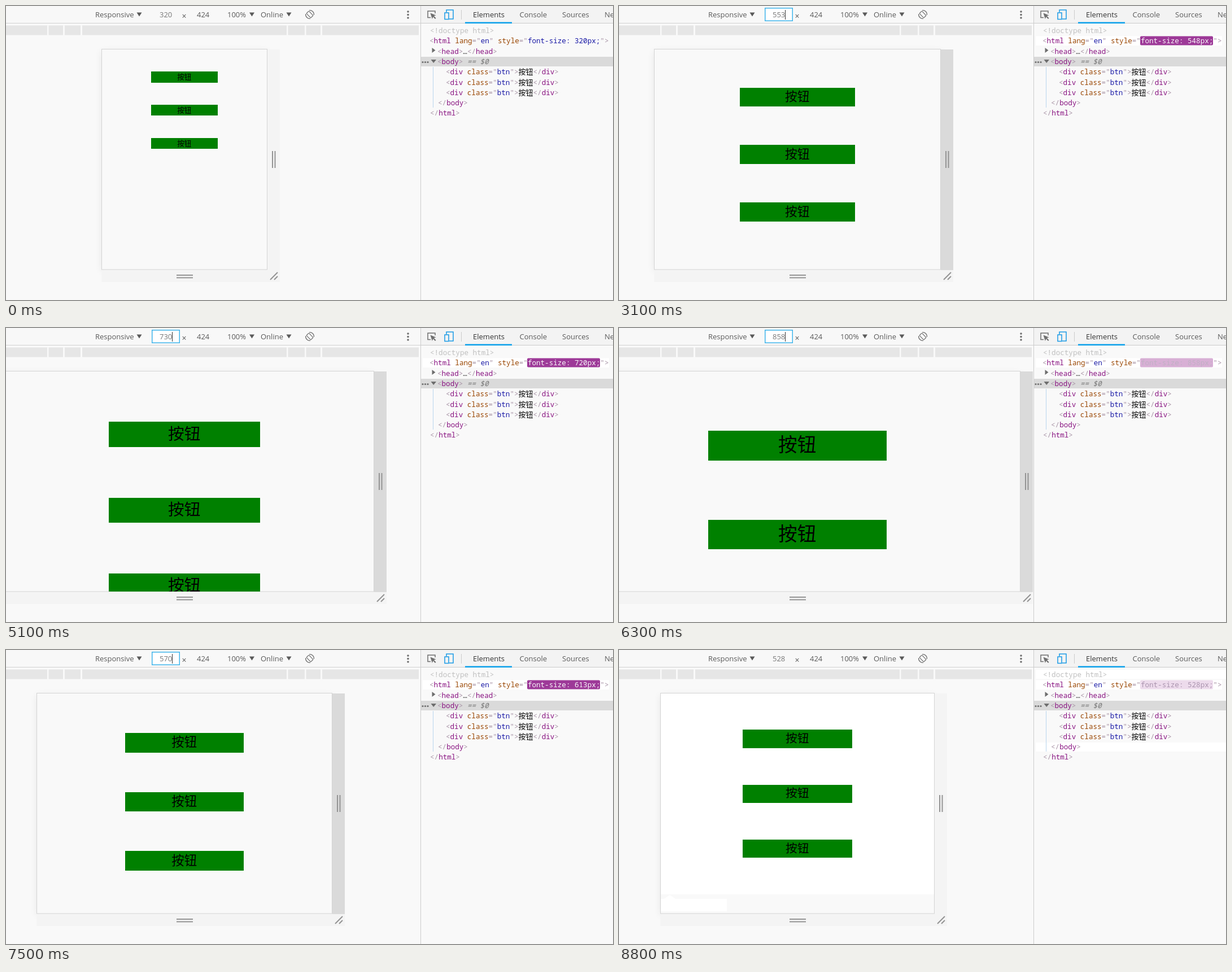
Write an HTML page that moves like this. It is 1075 by 521 pixels and loops after 8900 ms.

```html
<!DOCTYPE html>
<html lang="en">
<head>
<meta charset="utf-8">
<style>
html, body { margin: 0; width: 100%; height: 100%; overflow: hidden; background: #f9f9f9; }
svg { display: block; }
text { white-space: pre; }
.ui { font: 13px "Open Sans", "Noto Sans", sans-serif; fill: #5a5a5a; }
.code { font: 12.6px "Noto Sans Mono", monospace; fill: #a894a6; }
.cjk { font-family: "Noto Sans CJK SC", "Noto Sans CJK", sans-serif; fill: #000; }
.tag { fill: #881280; }
.attr { fill: #994500; }
.val { fill: #1a1aa6; }
.line { fill: none; stroke: #6e6e6e; stroke-width: 1.5; }
.grip { fill: none; stroke: #949494; stroke-width: 2; }
</style>
</head>
<body>
<svg width="1075" height="521" viewBox="0 0 1075 521">
  <defs>
    <clipPath id="view"><rect y="52" width="734" height="469"/></clipPath>
    <clipPath id="page"><rect y="77" width="734" height="390"/></clipPath>
    <filter id="soft" x="-10%" y="-10%" width="120%" height="120%"><feGaussianBlur stdDeviation="7"/></filter>
  </defs>

  <g clip-path="url(#view)">
    <rect id="shadow" y="80" height="390" opacity=".07" filter="url(#soft)"/>
    <rect id="bottomBar" y="467" height="22" fill="#f4f4f4"/>
    <rect id="sideBar" y="77" width="22" height="391"/>
    <rect id="device" y="76.5" height="390.5" fill="#f9f9f9" stroke="#d4d4d4"/>
    <g id="late">
      <path fill="#fff" d="M74 77H558V433H74zM74 441H80L90 434 100 441H191V463H74z"/>
    </g>
    <g id="buttons" clip-path="url(#page)" text-anchor="middle"></g>
    <path class="grip" d="M302 477H331M302 481.5H331"/>
    <g id="grips" class="grip">
      <path d="M9 257V287M13.5 257V287M5 485L18 472M12 485L18 479"/>
    </g>
  </g>

  <rect width="734" height="30" fill="#f8f8f8"/>
  <path stroke="#d0d0d0" d="M0 30.5H734"/>
  <path stroke="#e6e6e6" stroke-width="17" d="M0 43H73M75.5 43H101M104 43H132M135 43H497M499.5 43H529M531.5 43H557M560 43H731"/>
  <g class="ui">
    <text x="158" y="20">Responsive</text>
    <text x="311.500" y="22.500" font-size="14">×</text>
    <text x="338" y="20">424</text>
    <text x="392" y="20">100%</text>
    <text x="451" y="20">Online</text>
  </g>
  <path fill="#5a5a5a" d="M231.500 11.500h9l-4.500 7zM431 11.500h9l-4.500 7zM496.500 11.500h9l-4.500 7z"/>
  <g transform="translate(538 15)" class="line" style="stroke-width:1.2">
    <rect x="-3" y="-5.500" width="6" height="11" rx="1" transform="rotate(-45)"/>
    <path d="M-1 -7.300A7.300 7.300 0 0 1 7.300 1M1 7.300A7.300 7.300 0 0 1 -7.300 -1"/>
  </g>
  <g fill="#6e6e6e"><circle cx="712" cy="10" r="1.800"/><circle cx="712" cy="15.500" r="1.800"/><circle cx="712" cy="21" r="1.800"/></g>
  <rect id="focus" x="258.750" y="3.750" width="48.500" height="22.500" fill="#fff" stroke="#3fb4ea" stroke-width="1.500"/>
  <path id="caret" stroke="#333" d="M294.500 7V24"/>
  <text id="width" class="ui" x="272" y="20" style="fill:#777"></text>

  <rect x="734" width="341" height="521" fill="#f9f9f9"/>
  <rect x="734" width="341" height="30" fill="#f3f3f3"/>
  <path stroke="#ccc" d="M734.500 0V521M734 30.500H1075M806.500 7V24"/>
  <path fill="#0a9fea" d="M813 28.500H896V31H813z"/>
  <path class="line" d="M752 20.500H747V9H760V13"/>
  <path fill="#6e6e6e" d="M751.500 12.500L761.500 16.500 757.800 17.800 761.500 21.500 760 23 756.300 19.300 754.800 23z"/>
  <path class="line" style="stroke:#1a9be6" d="M780 11V7H792V23H785M777 12H784V23.500H777z"/>
  <g class="ui">
    <text x="827" y="20" style="fill:#333">Elements</text>
    <text x="909.500" y="20">Console</text>
    <text x="985" y="20">Sources</text>
    <text x="1060" y="20">Network</text>
  </g>

  <rect id="rowDoctype" x="738" y="35" width="337" height="16" fill="#fff"/>
  <rect id="rowHtml" x="738" y="53.500" width="330" height="16.500" fill="#fff"/>
  <rect id="rowEnd" x="738" y="164" width="337" height="16" fill="#fff"/>
  <rect x="735" y="90" width="340" height="17" fill="#dadada"/>
  <path stroke="#b8d6ee" d="M756.500 108V180"/>
  <path fill="#6e6e6e" d="M754.500 74L760.500 78.500 754.500 83zM752.500 95H762L757.200 101z"/>
  <g fill="#6e6e6e"><circle cx="738" cy="99.500" r="1.600"/><circle cx="742.500" cy="99.500" r="1.600"/><circle cx="747" cy="99.500" r="1.600"/></g>
  <rect id="flash" x="923" y="53.500" width="129" height="16" rx="2" fill="rgb(152,46,146)"/>
  <g id="tree" class="code"></g>
</svg>
<script>
const LOOP = 8900, STEP = 100, CENTER = 315.9, TOP = 76.7, ZOOM = 0.92;
// Viewport width over time: [ms, px]
const KEYS = [[1300, 320], [1700, 403], [1800, 410], [2200, 461], [3000, 548], [3100, 553],
  [4000, 628], [5000, 720], [5100, 730], [5800, 848], [5900, 858], [6600, 858],
  [7400, 613], [7500, 570], [7600, 548], [7700, 535], [7800, 528]];

const $ = id => document.getElementById(id);
const set = (el, attrs) => { for (const k in attrs) el.setAttribute(k, attrs[k]); };
const show = (id, on) => { $(id).style.display = on ? '' : 'none'; };

const span = (cls, s) => `<tspan class="${cls}">${s}</tspan>`;
const open = (name, attrs = '') => '&lt;' + span('tag', name) + attrs + '&gt;';
const close = name => '&lt;/' + span('tag', name) + '&gt;';
const attr = (name, value) => ' ' + span('attr', name) + '="' + value + '"';

const button = open('div', attr('class', span('val', 'btn'))) +
  '<tspan class="cjk" font-size="13">按钮</tspan>' + close('div');
const rows = [
  [751, '<tspan fill="#c0c0c0">&lt;!doctype html&gt;</tspan>'],
  [750, open('html', attr('lang', span('val', 'en')) + attr('style', '<tspan id="size" class="val"></tspan>'))],
  [764, open('head') + '<tspan fill="#333">…</tspan>' + close('head')],
  [764, open('body') + '<tspan fill="#777" font-style="italic"> == $0</tspan>'],
  [779, button], [779, button], [779, button],
  [765, close('body')],
  [751, close('html')]
];
$('tree').innerHTML = rows.map(([x, s], i) => `<text x="${x}" y="${48 + 18.3 * i}">${s}</text>`).join('');
$('buttons').innerHTML = '<rect fill="#008000"/><text class="cjk">按钮</text>'.repeat(3);
const boxes = $('buttons').querySelectorAll('rect');
const labels = $('buttons').querySelectorAll('text');

function widthAt(t) {
  const i = KEYS.findIndex(k => k[0] > t);
  if (i === 0) return KEYS[0][1];
  if (i < 0) return KEYS[KEYS.length - 1][1];
  const [t0, a] = KEYS[i - 1], [t1, b] = KEYS[i];
  return Math.round(a + (b - a) * (t - t0) / (t1 - t0));
}

// Strength of the highlight that fades after the last change of font-size
function flashAt(t) {
  if (t < 1500) return 0;
  const age = t >= 7900 ? t - 7900 : t >= 6000 && t < 6800 ? t - 6000 : 0;
  return (1 - Math.min(Math.max(age, 20), 500) / 1400) ** 4;
}

function drawDevice(width) {
  const w = width * ZOOM, right = Math.round(CENTER + w / 2);
  const x = Math.round(CENTER - w / 2) + 0.5;
  set($('device'), { x, width: right - x - 0.5 });
  set($('shadow'), { x, width: w });
  set($('bottomBar'), { x, width: right + 22 - x });
  set($('sideBar'), { x: right });
  set($('grips'), { transform: `translate(${right} 0)` });
  const bx = Math.round(CENTER - w / 5), bw = Math.round(CENTER + w / 5) - bx;
  const size = w * 16 / 375;
  boxes.forEach((box, i) => {
    const top = TOP + w * (2 / 15 + i / 5), y = Math.round(top);
    set(box, { x: bx, y, width: bw, height: Math.round(top + w / 15) - y });
    set(labels[i], { x: CENTER - 0.2, y: top + w * 0.0308 + size * 0.38, 'font-size': size });
  });
}

function draw(t) {
  const width = widthAt(t), a = flashAt(t);
  drawDevice(width);
  $('width').textContent = width;
  $('size').textContent = `font-size: ${widthAt(t - STEP)}px;`;
  $('size').style.fill = a ? `rgb(${154 + 101 * a},${127 + 128 * a},${159 + 96 * a})` : '';
  set($('flash'), { opacity: a });
  set($('sideBar'), { fill: t >= 700 && t < 8200 ? '#dadada' : '#f4f4f4' });
  const focused = t >= 1200 && t < 8700;
  show('focus', focused);
  show('caret', focused);
  show('late', t >= 8100);
  show('rowHtml', t >= 100);
  show('rowEnd', t >= 8100);
  show('rowDoctype', t >= 8500);
}

function tick() {
  draw(Math.floor(performance.now() % LOOP / STEP) * STEP);
  requestAnimationFrame(tick);
}
tick();
</script>
</body>
</html>
```
